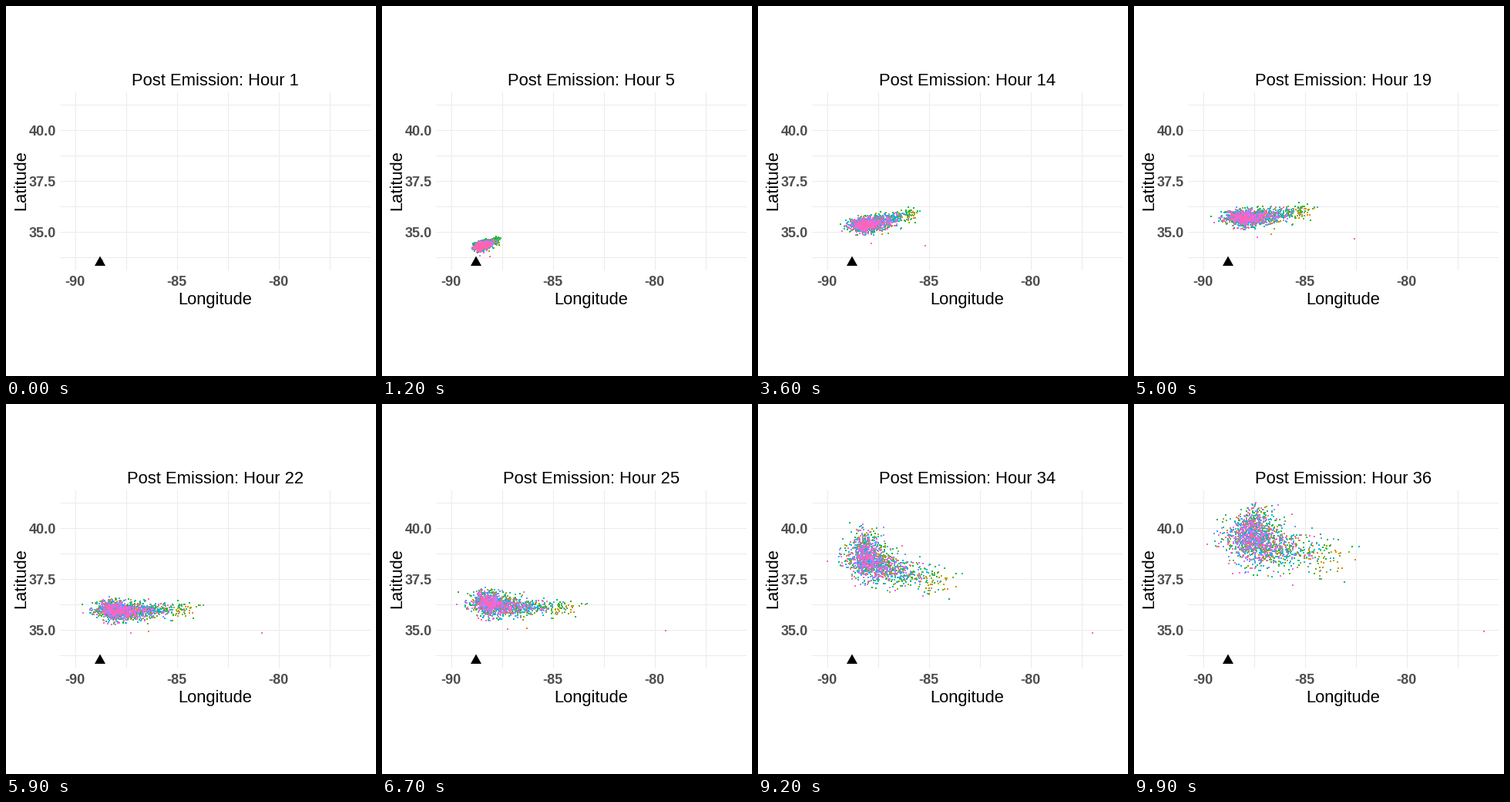
These frames come from a looping animation (480 by 480 pixels, 10000 ms). A matplotlib script:

```python
import numpy as np
import matplotlib.pyplot as plt
from matplotlib.animation import FuncAnimation

plt.rcParams["font.family"] = "Liberation Sans"
FRAMES, SIZE, HOURS = 100, 480, 36
HUES = np.array(["#F8766D", "#DE8C00", "#B79F00", "#7CAE00", "#00BA38", "#00C08B",
                 "#00BFC4", "#00B4F0", "#619CFF", "#C77CFF", "#F564E3", "#FF64B0"])

# Plume shape over time: x, y, x spread, y spread at the lobe, core and tail
TIMES = np.array([1, 9.13, 18.68, 24.69, 29.6, 33.5, 36])
PLUME = np.array([
    [(122, 332.5, .8, .8), (122, 332.5, .8, .8), (122, 332.5, .8, .8)],
    [(123, 296, 3.2, 3.5), (133, 295, 5, 3.6), (162, 286, 3, 3)],
    [(123, 271, 5, 3.5), (145, 276, 10, 4.4), (198, 269, 8, 4)],
    [(130, 246, 7, 4), (140, 262, 10, 6), (208, 264, 13, 4)],
    [(126, 208, 6, 5), (138, 239, 10, 7), (204, 247, 14, 5)],
    [(137, 164, 9, 5), (140, 207, 11, 8), (205, 224, 14, 8)],
    [(160, 135, 10, 4.5), (147, 179, 14, 12), (222, 194, 17, 11)],
])

# Particles that leave the plume: colour index and path
STRAYS = [
    (11, [(122, 330), (164, 320), (286, 302), (368, 294), (403, 296), (434, 297), (454, 295)]),
    (1, [(122, 332), (167, 282), (234, 262), (264, 260), (266, 251), (257, 237), (287, 202)]),
    (10, [(122, 332), (114, 303), (104, 281), (97, 260), (93, 231), (90, 204), (95, 182)]),
    (4, [(122, 332), (115, 293), (100, 273), (99, 244), (98, 199), (119, 154), (108, 150)]),
    (1, [(122, 332), (143, 300), (178, 296), (188, 291), (178, 270), (171, 244), (174, 223)]),
    (10, [(122, 332), (133, 317), (160, 300), (163, 292), (170, 272), (214, 249), (206, 235)]),
]
PATHS = np.array([path for _, path in STRAYS], float).transpose(1, 0, 2)

rng = np.random.default_rng(7)
N = 1650
age = np.sort(rng.uniform(.08, 1, N))
along = rng.normal(-.08, .38, N)
along += (rng.random(N) < .5) * rng.exponential(1, N) * .75 * (1 - age)
along = np.clip(along, -1, 1.4)
drift = np.clip(rng.standard_t(7, (N, 2)), -3.2, 3.2)
weights = np.stack([np.maximum(-along, 0), 1 - np.abs(along), np.maximum(along, 0)], 1)
colors = np.concatenate([HUES[(age * 11.99).astype(int)], HUES[[c for c, _ in STRAYS]]])


def smooth(values, t):
    """Cubic Hermite interpolation through the key times."""
    slope = np.gradient(values, TIMES, axis=0)
    i = min(np.searchsorted(TIMES, t, side="right") - 1, len(TIMES) - 2)
    step = TIMES[i + 1] - TIMES[i]
    u = (t - TIMES[i]) / step
    return ((1 + 2 * u) * (1 - u) ** 2 * values[i] + u * (1 - u) ** 2 * step * slope[i]
            + u * u * (3 - 2 * u) * values[i + 1] + u * u * (u - 1) * step * slope[i + 1])


def positions(hour):
    lobe, core, tail = shape = smooth(PLUME, hour)
    centre = weights @ shape[:, :2]
    spread = np.clip(weights, 0, 1)
    spread = spread / spread.sum(1, keepdims=True) @ shape[:, 2:]
    return np.round(np.vstack([centre + drift * spread, smooth(PATHS, hour)]))


fig = plt.figure(figsize=(SIZE / 72, SIZE / 72), dpi=72, facecolor="white")
ax = fig.add_axes([0, 0, 1, 1])
ax.set(xlim=(0, SIZE), ylim=(SIZE, 0))
ax.axis("off")

for k in range(6):
    x = 89.5 + 66 * k
    ax.plot([x, x], [112, 342], color="#EBEBEB", lw=1, zorder=0)
for k in range(4):
    for y in (127.5 + 66 * k, 160.5 + 66 * k):
        if y < 342:
            ax.plot([70, 472], [y, y], color="#EBEBEB", lw=1, zorder=0)


def label(x, y, text, size=22, **kw):
    return ax.text(x, y, text, fontsize=size, **{"ha": "center", "va": "baseline", **kw})


tick = dict(size=18, color="#4D4D4D", weight="bold")
for k in range(3):
    label(89 + 132 * k, 363, f"-{90 - 5 * k}", **tick)
    label(65, 168 + 66 * k, f"{40 - 2.5 * k:.1f}", ha="right", **tick)
label(271, 387, "Longitude")
label(25, 226, "Latitude", rotation=90, rotation_mode="anchor")
title = label(271.5, 103, "")

dots = ax.scatter(*positions(1).T, s=4, marker="s", c=colors, linewidths=0,
                  antialiased=False, zorder=2)
ax.fill([122, 129, 115], [324.5, 337, 337], color="black", lw=0, zorder=3)


def update(frame):
    hour = 1 + (HOURS - 1) * frame / (FRAMES - 1)
    dots.set_offsets(positions(hour))
    title.set_text(f"Post Emission: Hour {int(hour + .5)}")
    return dots, title


anim = FuncAnimation(fig, update, frames=FRAMES, interval=100, repeat=True, repeat_delay=0)
plt.show()
```
